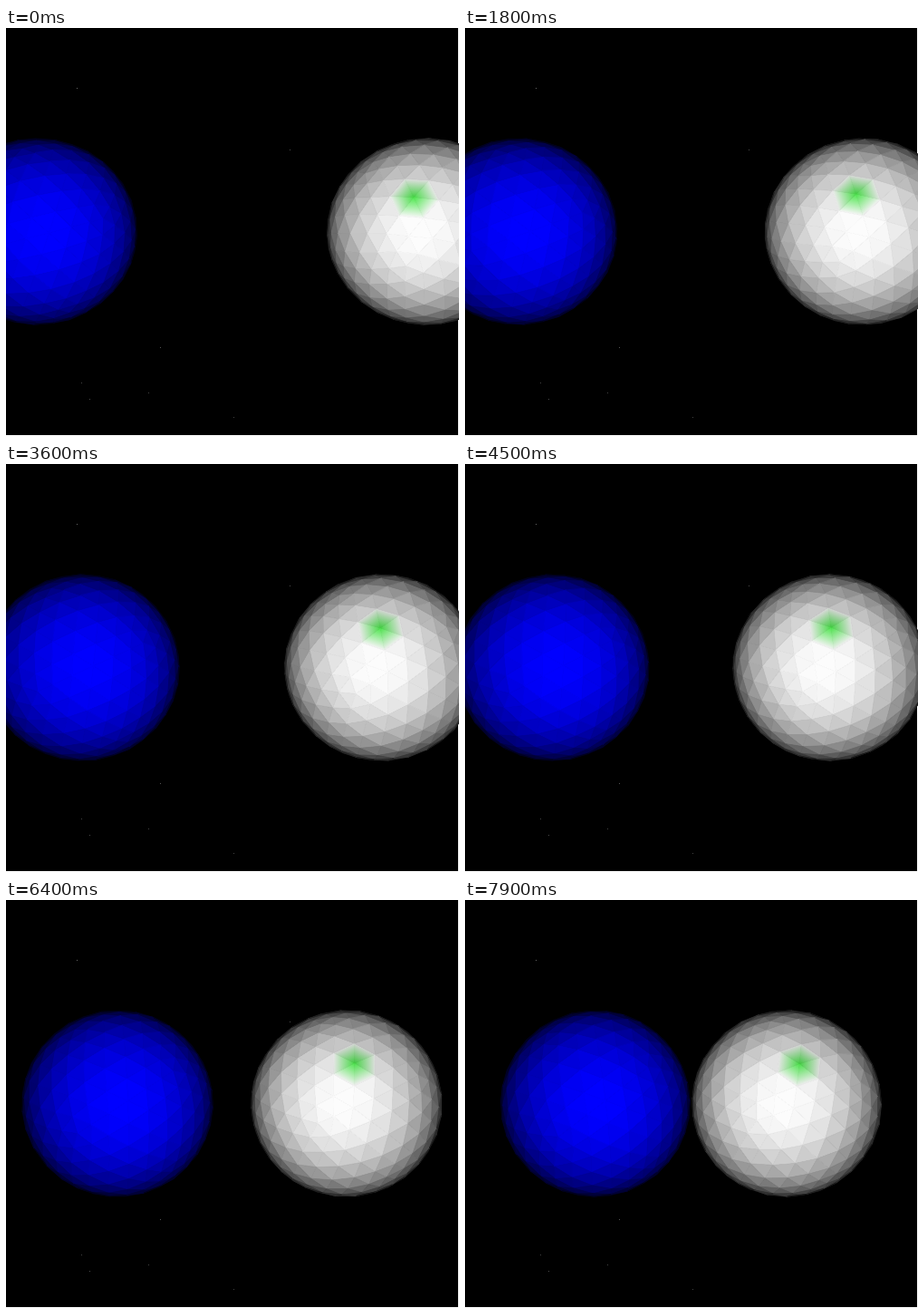
Recreate the animation shown at these times as an HTML page with a canvas. Size 500x450 px, loop 8000 ms.

```html
<!DOCTYPE html>
<html lang="en">
<head>
<meta charset="utf-8">
<title>Two spheres</title>
<style>
html, body { margin: 0; width: 100%; height: 100%; overflow: hidden; background: #000; }
canvas { display: block; }
</style>
</head>
<body>
<canvas id="stage" width="500" height="450"></canvas>
<script>
const ctx = document.getElementById('stage').getContext('2d');
const LOOP = 8000, STEP = 100;
const MID_X = 249.5, MID_Y = 224.5;
const FOCAL = 542;       // 45 degree field of view
const RADIUS = 0.1862;   // in units of the camera distance
const START = 0.3833, SPEED = 0.0247;

// x, y, grey level
const stars = [
  [78, 66, 100], [313, 134, 75], [170, 352, 85], [83, 391, 65],
  [92, 409, 75], [157, 402, 65], [251, 429, 65]
];

const add = (a, b) => a.map((v, i) => v + b[i]);
const sub = (a, b) => a.map((v, i) => v - b[i]);
const mul = (a, k) => a.map(v => v * k);
const dot = (a, b) => a[0] * b[0] + a[1] * b[1] + a[2] * b[2];
const cross = (a, b) => [
  a[1] * b[2] - a[2] * b[1],
  a[2] * b[0] - a[0] * b[2],
  a[0] * b[1] - a[1] * b[0]
];
const unit = a => mul(a, 1 / Math.hypot(...a));

function turn(v, axis, angle) {
  const c = Math.cos(angle), s = Math.sin(angle);
  return add(add(mul(v, c), mul(cross(axis, v), s)), mul(axis, dot(axis, v) * (1 - c)));
}

// The 20 triangles of an icosahedron, wound outwards
function icosahedron() {
  const phi = (1 + Math.sqrt(5)) / 2;
  const points = [];
  for (const a of [-1, 1]) for (const b of [-phi, phi])
    points.push([a, b, 0], [0, a, b], [b, 0, a]);
  const near = (p, q) => Math.hypot(...sub(p, q)) < 2.1;
  const faces = [];
  points.forEach((p, i) => points.slice(i + 1).forEach((q, j) => {
    for (const r of points.slice(i + j + 2)) {
      if (!near(p, q) || !near(q, r) || !near(p, r)) continue;
      const outward = dot(cross(sub(q, p), sub(r, p)), p) > 0;
      faces.push(outward ? [p, q, r] : [p, r, q]);
    }
  }));
  return faces;
}

// Split every edge in n parts and push the points out to the sphere
function icosphere(n) {
  const verts = [], faces = [], known = new Map();
  const index = p => {
    const v = unit(p);
    const key = v.map(c => Math.round(c * 1000)).join();
    if (!known.has(key)) known.set(key, verts.push(v) - 1);
    return known.get(key);
  };
  for (const [p, q, r] of icosahedron()) {
    const at = (i, j) => index(add(mul(p, n - i - j), add(mul(q, i), mul(r, j))));
    for (let i = 0; i < n; i++) for (let j = 0; j < n - i; j++) {
      faces.push([at(i, j), at(i + 1, j), at(i, j + 1)]);
      if (i + j < n - 1) faces.push([at(i + 1, j), at(i + 1, j + 1), at(i, j + 1)]);
    }
  }
  const spot = index(icosahedron()[0].reduce(add));
  return { verts, faces, spot };
}

const mesh = icosphere(6);
const beside = mesh.faces.find(f => f.includes(mesh.spot)).find(i => i !== mesh.spot);

function frameOf(n, toward) {
  const e = unit(sub(toward, mul(n, dot(n, toward))));
  return [n, e, cross(n, e)];
}

// Turn the mesh so that the spot vertex lies at `pos` with a neighbour straight below
function pose(pos) {
  const from = frameOf(mesh.verts[mesh.spot], mesh.verts[beside]);
  const to = frameOf(unit(pos), [0, -1, 0]);
  return mesh.verts.map(v =>
    from.reduce((sum, axis, i) => add(sum, mul(to[i], dot(axis, v))), [0, 0, 0]));
}

function makeBall(side, pos, poseTime, spin, color, spot) {
  return {
    side, poseTime, color, spot,
    verts: pose(pos), axis: unit(spin), rate: Math.hypot(...spin)
  };
}

const balls = [
  makeBall(-1, [0.13, 0.33, 0.93], 4.5, [0.012, -0.02, 0.05], [0, 0, 255], false),
  makeBall(1, [-0.133, 0.368, 0.92], 5.7, [0.01, 0.024, -0.068], [252, 252, 252], true)
];

const rgb = c => `rgb(${c.map(v => Math.round(Math.min(255, v))).join()})`;

function project(p) {
  return [MID_X - FOCAL * p[0] / p[2], MID_Y + FOCAL * p[1] / p[2]];
}

// Green at corner g fading towards the opposite edge a-b
function spotFill([g, a, b], base, light) {
  const ex = b[0] - a[0], ey = b[1] - a[1];
  const k = ((g[0] - a[0]) * ex + (g[1] - a[1]) * ey) / (ex * ex + ey * ey);
  const fill = ctx.createLinearGradient(...g, a[0] + ex * k, a[1] + ey * k);
  fill.addColorStop(0, rgb([80 * light, 238 * light, 80 * light]));
  fill.addColorStop(1, rgb(base));
  return fill;
}

function drawBall(ball, t) {
  const center = [ball.side * (START - SPEED * t), 0, -1];
  const angle = ball.rate * (t - ball.poseTime);
  const world = ball.verts.map(v => add(center, mul(turn(v, ball.axis, angle), RADIUS)));
  for (const face of mesh.faces) {
    const [a, b, c] = face.map(i => world[i]);
    const normal = unit(cross(sub(b, a), sub(c, a)));
    const facing = -dot(normal, unit(add(add(a, b), c)));
    if (facing <= 0) continue;
    const light = Math.min(1, 0.08 + 0.93 * facing);
    const base = mul(ball.color, light);
    const at = ball.spot ? face.indexOf(mesh.spot) : -1;
    const first = Math.max(at, 0);
    const corners = [0, 1, 2].map(i => project(world[face[(first + i) % 3]]));
    ctx.fillStyle = ctx.strokeStyle = at < 0 ? rgb(base) : spotFill(corners, base, light);
    ctx.beginPath();
    corners.forEach(p => ctx.lineTo(...p));
    ctx.closePath();
    ctx.fill();
    ctx.stroke();
  }
}

function draw(ms) {
  const t = Math.floor((ms % LOOP) / STEP) * STEP / 1000;
  ctx.fillStyle = '#fff';
  ctx.fillRect(0, 0, 500, 450);
  ctx.fillStyle = '#000';
  ctx.fillRect(0, 0, 499, 449);
  for (const [x, y, level] of stars) {
    ctx.fillStyle = rgb([level, level, level]);
    ctx.fillRect(x, y, 1, 1);
  }
  ctx.lineWidth = 0.9;
  ctx.lineJoin = 'round';
  balls.forEach(ball => drawBall(ball, t));
}

const begin = performance.now();
function tick() {
  draw(performance.now() - begin);
  requestAnimationFrame(tick);
}
tick();
</script>
</body>
</html>
```
